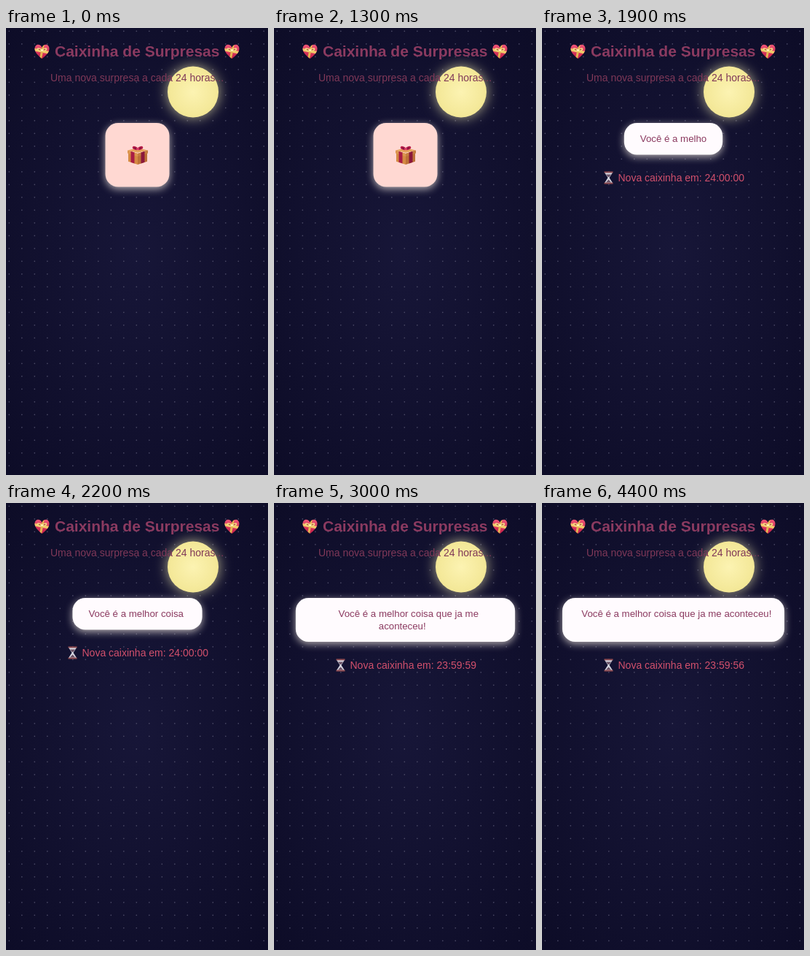
An HTML page with a canvas for the animation above (4.5 s loop, 360x612 px).

```html
<!DOCTYPE html>
<html lang="pt">
<head>
<meta charset="utf-8">
<title>Caixinha de Surpresas</title>
<style>
html, body { margin: 0; width: 100%; height: 100%; overflow: hidden; background: #0d0c27; }
canvas { display: block; width: 360px; height: 612px; }
</style>
</head>
<body>
<canvas id="stage" width="360" height="612"></canvas>
<script>
const W = 360, H = 612, LOOP = 4500, MID = 180.5, GRID = 17.5;
const OPEN = 1320, CHAR_MS = 40, TICK = 620, FIRST_TICK = 2480, WRAP = 2960, UNWRAP = 3100;
const FAMILY = '"Liberation Sans", Arial, sans-serif';
const PLUM = '#8b3a60', ROSE = '#d2506c', WHITE = '#fffbfe';
const MESSAGE = 'Você é a melhor coisa que ja me aconteceu!';
const BREAK = MESSAGE.lastIndexOf(' ');
const HEARTS = [36, 54, 102, 110, 122, 150, 241, 271];
const SIDES = [-1, 1];
const ctx = document.getElementById('stage').getContext('2d');

function text(str, x, y, size, color, weight = '') {
  ctx.font = `${weight} ${size}px ${FAMILY}`;
  ctx.fillStyle = color;
  ctx.fillText(str, x, y);
}

function textWidth(str, size) {
  ctx.font = `${size}px ${FAMILY}`;
  return ctx.measureText(str).width;
}

function rect(color, x, y, w, h) {
  ctx.fillStyle = color;
  ctx.fillRect(x, y, w, h);
}

function oval(color, x, y, rx, ry = rx, turn = 0) {
  ctx.beginPath();
  ctx.ellipse(x, y, rx, ry, turn, 0, Math.PI * 2);
  ctx.fillStyle = color;
  ctx.fill();
}

// Star with n tips; inner is the notch radius relative to the tips
function star(color, x, y, rx, ry, n, inner) {
  ctx.beginPath();
  for (let i = 0; i < 2 * n; i++) {
    const a = i * Math.PI / n, k = i % 2 ? inner : 1;
    ctx.lineTo(x + Math.cos(a) * rx * k, y + Math.sin(a) * ry * k);
  }
  ctx.fillStyle = color;
  ctx.fill();
}

function wedge(color, halfWidth, base, tip) {
  ctx.beginPath();
  ctx.moveTo(-halfWidth, base);
  ctx.lineTo(halfWidth, base);
  ctx.lineTo(0, tip);
  ctx.fillStyle = color;
  ctx.fill();
}

function scoped(draw) {
  ctx.save();
  draw();
  ctx.restore();
}

function at(x, y, draw) {
  scoped(() => { ctx.translate(x, y); draw(); });
}

function glow(color, blur, dy, draw) {
  scoped(() => {
    Object.assign(ctx, { shadowColor: color, shadowBlur: blur, shadowOffsetY: dy });
    draw();
  });
}

function fade(gradient, from, to) {
  gradient.addColorStop(0, from);
  gradient.addColorStop(1, to);
  return gradient;
}

function heart(r, top, bottom) {
  ctx.beginPath();
  ctx.moveTo(0, r);
  for (const s of SIDES) {
    ctx.moveTo(0, r);
    ctx.bezierCurveTo(s * r / 2, r * 0.6, s * r, r * 0.15, s * r, -r * 0.35);
    ctx.bezierCurveTo(s * r, -r * 1.05, s * r * 0.2, -r * 1.1, 0, -r / 2);
  }
  ctx.fillStyle = fade(ctx.createLinearGradient(0, -r, 0, r), top, bottom);
  ctx.fill();
}

function bow(y, rx, ry, color, hole, knot) {
  for (const s of SIDES) {
    oval(color, s * rx * 0.9, y, rx, ry, -s * 0.4);
    oval(hole, s * rx * 0.9, y, rx * 0.45, ry * 0.35, -s * 0.4);
  }
  oval(knot, 0, y + 1, ry * 0.8);
}

function ribbonHeart() {
  heart(10, '#ef5878', '#c41c48');
  scoped(() => {
    ctx.clip();
    ctx.rotate(0.2);
    rect('#f0ca68', -11, -2, 22, 3.6);
    rect('#e5b552', -1.5, -11, 3, 22);
  });
  bow(-2.4, 3.7, 2, '#f7dc87', '#a64c35', '#fff0ad');
}

function gift() {
  star('#e5a35b', 0, -6, 14, 4.6, 2, Math.SQRT1_2);
  for (const s of SIDES) scoped(() => {
    ctx.transform(s, -s * s * 0.33, 0, 1, 0, 0);
    rect(s < 0 ? '#d58a43' : '#bd7137', 0, -1.5, 13, 15);
    rect(s < 0 ? '#dc9650' : '#c67e40', 0, -1.5, 14, 4);
    rect(s < 0 ? '#a81d45' : '#8b183c', 4.5, -1.5, 5, 15);
  });
  bow(-9, 3.9, 2.3, '#b91f4c', '#711334', '#dc4168');
}

function hourglass() {
  for (const s of SIDES) scoped(() => {
    ctx.scale(1, s);
    wedge('#d6d6e0', 5.5, 7, -1.5);
    wedge('#675064', 3.6, s < 0 ? 4.5 : 6.6, s < 0 ? 0 : 2.5);
    rect('#8d4a50', -6, 6.6, 12, 2);
  });
}

function sparklingHeart() {
  heart(11, '#ec3f92', '#cb1668');
  star('#ffd866', -8, 1, 5, 5, 4, 0.35);
  star('#ffd866', 7, -6, 4, 4, 4, 0.35);
}

function background() {
  scoped(() => {
    ctx.translate(W / 2, H / 2);
    ctx.scale(1, H / W);
    rect(fade(ctx.createRadialGradient(0, 0, 0, 0, 0, W / Math.SQRT2), '#171638', '#0d0c27'),
      -W / 2, -W / 2, W, W);
  });
  for (let y = 4.3; y < H; y += GRID)
    for (let x = 4.3; x < W; x += GRID) oval('#4b4a66', x, y, 0.85);
}

function moon() {
  const body = fade(ctx.createRadialGradient(257, 87.5, 0, 257, 87.5, 35), '#fcf3b2', '#f3e796');
  glow('rgba(255,248,185,0.7)', 18, 0, () => oval(body, 257, 87.5, 35));
}

function header() {
  text('Caixinha de Surpresas', 67, 38.8, 21, PLUM, 'bold');
  for (const s of SIDES) at(180 + s * 130.5, 32, ribbonHeart);
  text('Uma nova surpresa a cada 24 horas...', 61, 73, 14, '#7f3858');
}

function card(width, height, color) {
  glow('rgba(255,246,235,0.68)', 11, 3, () => {
    ctx.beginPath();
    ctx.roundRect(-width / 2, 130, width, height, GRID);
    ctx.fillStyle = color;
    ctx.fill();
  });
}

// Shrinks the card to its text; the finished message wraps briefly, then settles on one line
function messageCard(t) {
  const size = 13.28, pad = 22, drift = 4.3;
  const count = Math.floor((t - OPEN) / CHAR_MS);
  const typed = MESSAGE.slice(0, count);
  const done = t >= WRAP, wrapped = done && t < UNWRAP;
  const lines = wrapped ? [MESSAGE.slice(0, BREAK), MESSAGE.slice(BREAK + 1)] : [typed];
  const widest = wrapped ? MESSAGE.slice(0, -1) : typed;
  const flip = 1 - (1 - Math.min(1, (t - OPEN) / 700)) ** 2.25;
  at(MID, 0, () => {
    ctx.scale(Math.max(0.01, Math.sin(flip * Math.PI / 2)), 1);
    card(textWidth(widest, size) + 2 * pad, done ? 60 : 43.5, WHITE);
    lines.forEach((line, i) => {
      const shift = done ? drift * (i ? -1 : 1) : 0;
      text(line, shift - textWidth(line, size) / 2, 156 + i * 16.5, size, PLUM);
    });
  });
}

function timer(t) {
  const y = t < WRAP ? 205 : 222;
  const gone = Math.max(0, 1 + Math.floor((t - FIRST_TICK) / TICK));
  const clock = gone ? `23:59:${60 - gone}` : '24:00:00';
  at(91.5, y, hourglass);
  text(`Nova caixinha em: ${clock}`, 104.5, y + 5, 14, ROSE);
}

function render(t) {
  background();
  moon();
  header();
  if (t < OPEN) {
    at(MID, 0, () => card(88, 87.5, '#ffd8d2'));
    at(181, 173.5, gift);
    return;
  }
  messageCard(t);
  timer(t);
  const y = 2 - (t - 1600) * 0.045;
  for (const x of HEARTS) at(x, y, sparklingHeart);
}

const start = performance.now();
function frame() {
  render((performance.now() - start) % LOOP);
  requestAnimationFrame(frame);
}
frame();
</script>
</body>
</html>
```
